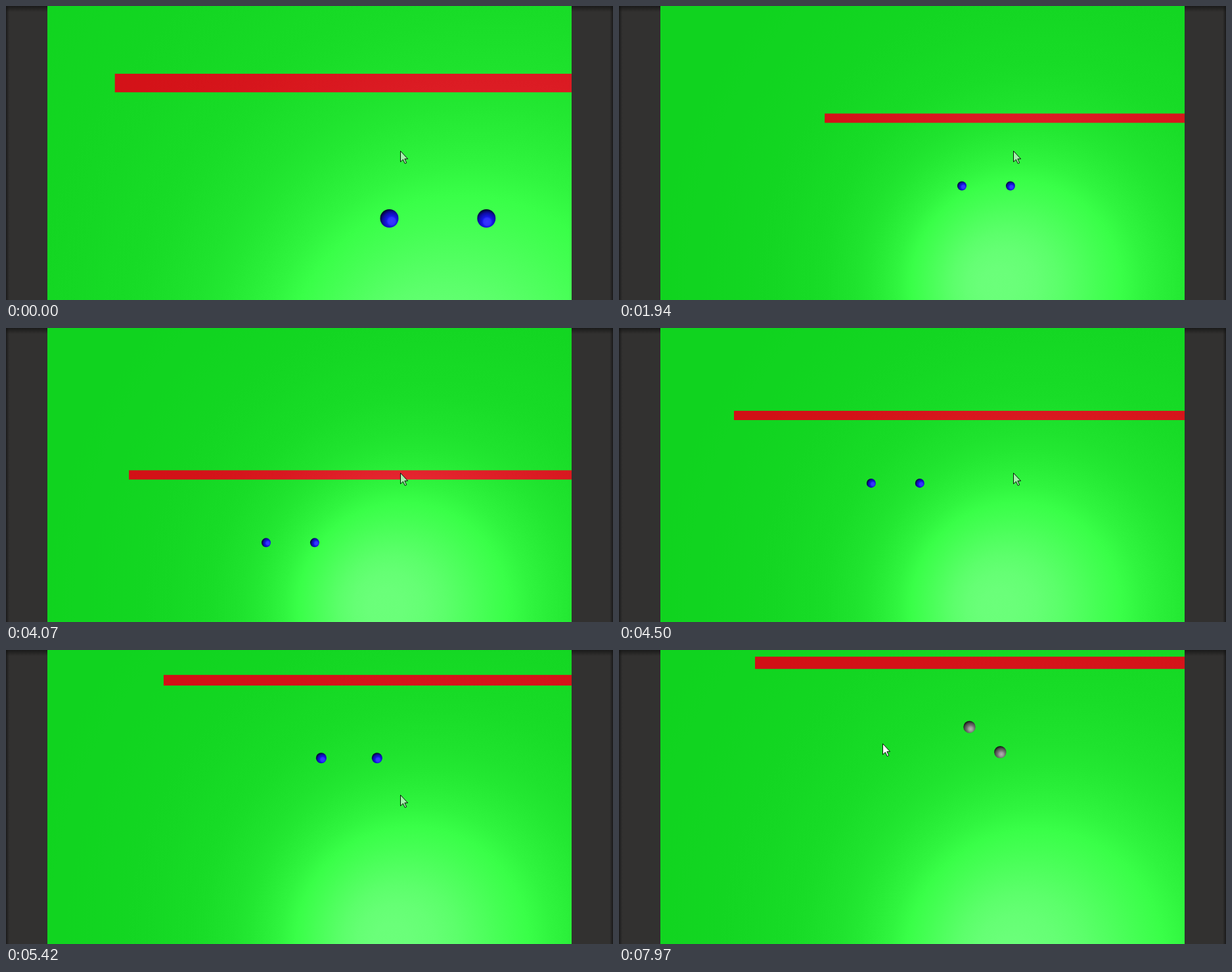
An HTML page with a canvas that plays this animation: 924x447 px, repeating every 8 s.

```html
<!DOCTYPE html>
<html lang="en">
<head>
<meta charset="utf-8">
<title>Scene view</title>
<style>
html, body { margin: 0; width: 100%; height: 100%; overflow: hidden; background: #323130; }
canvas { display: block; }
</style>
</head>
<body>
<canvas id="stage" width="924" height="447"></canvas>
<script>
const ctx = document.getElementById('stage').getContext('2d');
const LOOP = 8000, W = 924, H = 447, LEFT = 63, RIGHT = 861, CX = 460.5, CY = 224;
const PICK = 6200, DRAG = 6450, DROP = 7290, PICK2 = 7560;

// Wheel zooms in equal ratios; the first step shows at `from`, the last at `to`
const zooms = [
  { from: 230, to: 410, steps: 3, scale: 0.884 },
  { from: 560, to: 920, steps: 7, scale: 0.626 },
  { from: 1150, to: 1380, steps: 6, scale: 0.5 },
  { from: 5290, to: 5560, steps: 6, scale: 0.66 }
];

// Eased legs; bx, by bow a leg sideways. Pan holds the left ball at half scale.
const pan = {
  x: 522, y: 273.5,
  legs: [
    { from: 1940, to: 2720, x: 330, y: 273.5 },
    { from: 2720, to: 3400, x: 396.5, y: 273.5 },
    { from: 3400, to: 3620, x: 396, y: 236 },
    { from: 3620, to: 4110, x: 396, y: 328 },
    { from: 4180, to: 4890, x: 477, y: 113, bx: -48 },
    { from: 4890, to: 5250, x: 477.4, y: 172 }
  ]
};
const pointer = {
  x: 600, y: 220,
  legs: [
    { from: 5560, to: 6220, x: 484, y: 151 },
    { from: DRAG, to: DROP, x: 534.5, y: 113, bx: 75, by: -60 },
    { from: 7340, to: 7500, x: 577, y: 153 },
    { from: 7580, to: 7970, x: 401, y: 142, by: 33 }
  ]
};

const clamp = v => Math.min(1, Math.max(0, v));
const ease = u => u * u * (3 - 2 * u);

function follow(path, t) {
  let { x, y } = path;
  for (const { from, to, x: tx, y: ty, bx = 0, by = 0 } of path.legs) {
    const u = ease(clamp((t - from) / (to - from))), bow = Math.sin(Math.PI * u);
    x += (tx - x) * u + bx * bow;
    y += (ty - y) * u + by * bow;
    if (u < 1) break;
  }
  return { x, y };
}

function scaleAt(t) {
  let s = 1;
  for (const { from, to, steps, scale } of zooms) {
    if (t < from) break;
    const n = 1 + Math.floor(clamp((t - from) / (to - from)) * (steps - 1));
    s *= (scale / s) ** (n / steps);
  }
  return s;
}

// Light falloff: each channel is base + gain * level(distance)
function lit(light, base, gain) {
  const reach = 640, stops = 24, R = reach * light.k;
  const g = ctx.createRadialGradient(light.x, light.y, 0, light.x + 130 * light.k, light.y, R);
  for (let i = 0; i <= stops; i++) {
    const level = 1 / (1 + (i / stops * reach / 150) ** 2.6);
    const rgb = base.map((b, c) => Math.min(255, b + gain[c] * level));
    g.addColorStop(i / stops, `rgb(${rgb})`);
  }
  return g;
}

function ball(x, y, r, light, tones) {
  const dx = light.x + 150 - x, dy = light.y - y, len = Math.hypot(dx, dy) + 50;
  const hx = x + dx / len * r * 0.45, hy = y + dy / len * r * 0.45;
  const g = ctx.createRadialGradient(hx, hy, 0, hx, hy, r * 1.4);
  [0, 0.28, 0.4, 0.7, 1].forEach((p, i) => g.addColorStop(p, tones[i]));
  ctx.fillStyle = g;
  ctx.beginPath();
  ctx.arc(x, y, r, 0, 2 * Math.PI);
  ctx.fill();
}
const blue = ['#3838ff', '#3030fc', '#1616e6', '#0c0ca0', '#000018'];
const grey = ['#b4b4b4', '#949494', '#787878', '#4c4c4c', '#0a0a0a'];

const arrow = new Path2D('M.5 .5V17L4.4 13.4 7.3 19.6 9.7 18.5 6.9 12.4H11.6Z');
function cursor({ x, y }, fill) {
  ctx.save();
  ctx.translate(Math.round(x), Math.round(y));
  ctx.fillStyle = fill;
  ctx.fill(arrow);
  ctx.strokeStyle = '#0a140a';
  ctx.stroke(arrow);
  ctx.restore();
}

function shade(x0, y0, x1, y1) {
  const g = ctx.createLinearGradient(x0, y0, x1, y1);
  g.addColorStop(0, 'rgba(18,18,18,.75)');
  g.addColorStop(1, 'rgba(18,18,18,0)');
  ctx.fillStyle = g;
  ctx.fillRect(0, 0, W, H);
}

function draw(t) {
  const s = scaleAt(t), c = follow(pan, t);
  const light = { x: 504 + 136 * s, y: 290 + 270 * s, k: 0.3 + 1.4 * s };

  ctx.fillStyle = '#323130';
  ctx.fillRect(0, 0, W, H);
  shade(0, 0, 0, 9);
  shade(0, 0, 5, 0);
  shade(W, 0, W - 5, 0);

  ctx.save();
  ctx.beginPath();
  ctx.rect(LEFT, 0, RIGHT - LEFT, H);
  ctx.clip();
  ctx.fillStyle = lit(light, [14, 209, 29], [93, 100, 93]);
  ctx.fillRect(LEFT, 0, RIGHT - LEFT, H);

  const x = CX + (c.x - CX) * 2 * s, y = CY + (c.y - CY) * 2 * s;
  ctx.fillStyle = lit(light, [208, 14, 19], [62, 70, 85]);
  ctx.fillRect(x - 417.8 * s, y - 220 * s, W, 28.2 * s);

  // The grabbed ball hangs on the pointer
  let first = { x, y };
  if (t >= DRAG) {
    const held = follow(pointer, Math.min(t, DROP));
    first = { x: held.x - 1, y: held.y + 4 };
  }
  ball(x + 147.8 * s, y, 14 * s, light, t < PICK2 ? blue : grey);
  ball(first.x, first.y, 14 * s, light, t < PICK ? blue : grey);
  ctx.restore();

  cursor(follow(pointer, t), t < 5560 ? '#a6f2ae' : '#ffffff');
}

const begin = performance.now();
function frame() {
  draw((performance.now() - begin) % LOOP);
  requestAnimationFrame(frame);
}
frame();
</script>
</body>
</html>
```
